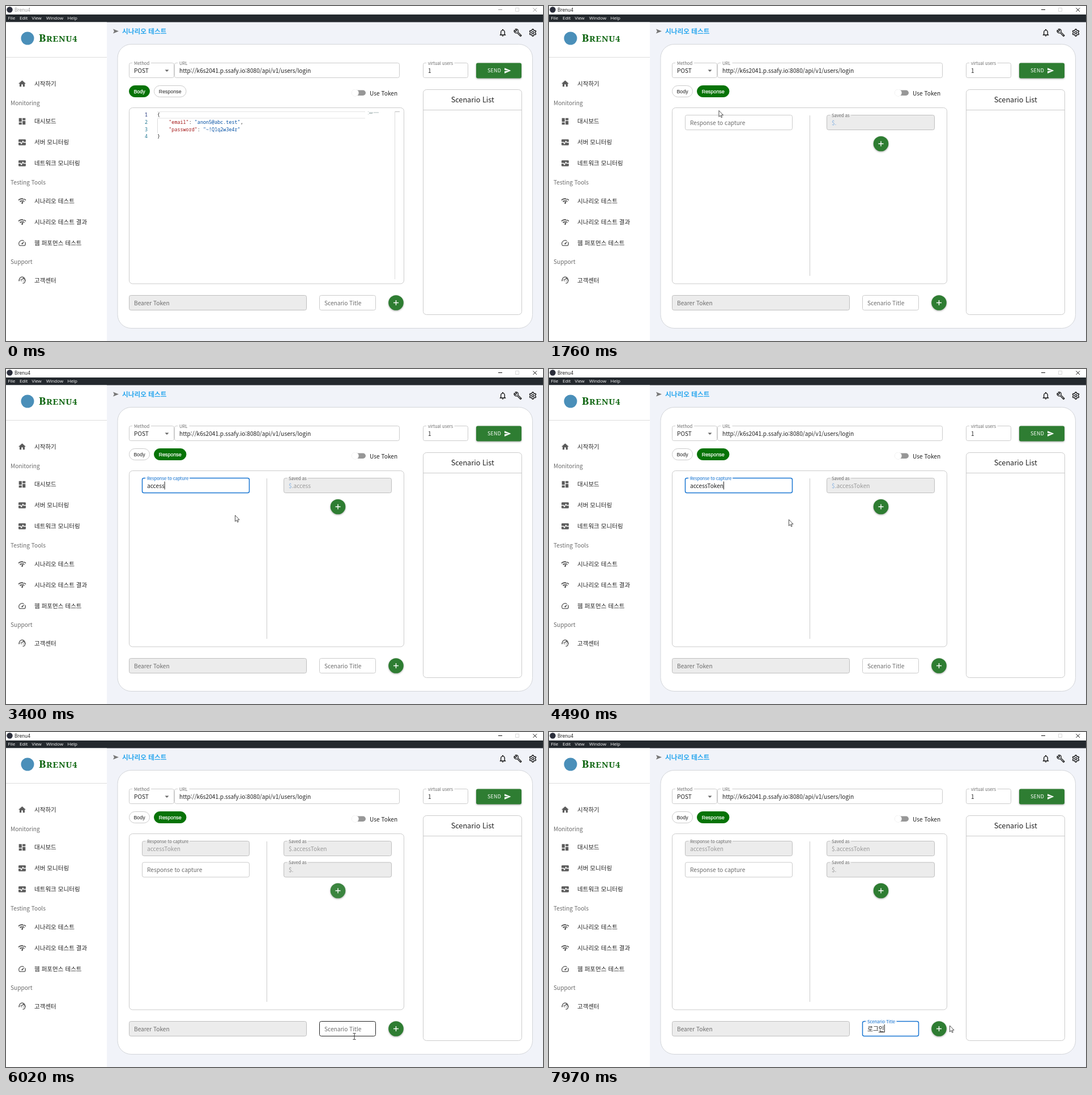
An HTML page that plays this animation: 948 by 591 pixels, repeating every 7990 ms.

```html
<!DOCTYPE html>
<html lang="ko">
<head>
<meta charset="utf-8">
<title>Scenario test</title>
<style>
  html, body { margin: 0; width: 100%; height: 100%; overflow: hidden; background: #f1f3f9; }
  svg { display: block; }
  text { font-family: "Noto Sans CJK KR", "Noto Sans CJK", "Noto Sans", sans-serif; white-space: pre; }
  .menu { font-family: "Open Sans", sans-serif; }
  .chip { font-family: "Liberation Sans", Arial, sans-serif; }
  .code { font-family: "Noto Sans Mono", monospace; }
  .brand { font-family: "Noto Serif", serif; font-weight: 600; letter-spacing: .8px; }
  .raised { filter: drop-shadow(0 1.5px 1.5px rgba(0, 0, 0, .35)); }
</style>
</head>
<body>
<svg width="948" height="591" viewBox="0 0 948 591"><g id="base"></g><g id="live"></g></svg>
<script>
const LOOP = 7990, SIZE = 10.15, SMALL = 7.62;
const BLUE = '#1976d2', GREEN = '#2e7d32', LINE = '#cbcbcb', INK = '#222', MUTED = '#6c6c6c';

const ICONS = {
  home: 'M10 20v-6h4v6h5v-8h3L12 3 2 12h3v8z',
  board: 'M3 13h8V3H3zm0 8h8v-6H3zm10 0h8V11h-8zm0-18v6h8V3z',
  pulse: 'M4 4h16q2 0 2 2v5h-5.500l-1.500-3q-1-1-2 0l-3 6-1.500-3H2V6q0-2 2-2zM2 13h5.300l1.700 3.500q1 1 2 0l3-6 1.300 2.500H22v5q0 2-2 2H4q-2 0-2-2z',
  network: 'M15.900 5c-.2 0-.4.1-.5.4L10.200 17c-.7 1.500.4 3 1.800 3 1 0 1.800-.7 2-1.600L16.400 5.500q0-.5-.5-.5zM1 9l2 2c2.900-2.900 6.800-4.100 10.500-3.600l1.200-2.700C9.900 3.800 4.700 5.300 1 9zm20 2 2-2c-1.600-1.600-3.500-2.800-5.600-3.600l-.5 2.900c1.500.6 2.900 1.500 4.100 2.700zm-4 4 2-2c-.8-.8-1.700-1.400-2.700-1.900l-.5 2.900q.7.4 1.200 1zM5 13l2 2c1.100-1.100 2.600-1.800 4-2l1.300-2.900C9.700 10 7 11 5 13z',
  speed: 'M20.400 8.600l-1.200 1.800a8 8 0 0 1-.3 7.600H5.100A8 8 0 0 1 15.600 6.900l1.800-1.300A10 10 0 0 0 3.400 19a2 2 0 0 0 1.700 1h13.800a2 2 0 0 0 1.800-1 10 10 0 0 0-.3-10.400zm-9.800 6.800a2 2 0 0 0 2.800 0l5.700-8.500-8.500 5.700a2 2 0 0 0 0 2.800z',
  send: 'M2 21 23 12 2 3v7l15 2-15 2z',
  bell: 'M12 22c1.100 0 2-.9 2-2h-4c0 1.100.9 2 2 2zm6-6v-5c0-3.100-1.600-5.600-4.500-6.300V4a1.500 1.500 0 0 0-3 0v.7C7.600 5.400 6 7.900 6 11v5l-2 2v1h16v-1zm-2 1H8v-6c0-2.500 1.500-4.500 4-4.500s4 2 4 4.500z',
  wrench: 'M22.600 19l-9.100-9.100c.9-2.300.5-5.100-1.400-7C9.800.6 6.200.4 3.700 2.300l3.800 3.800-1.400 1.400-3.900-3.800C.4 6.200.6 9.800 2.900 12.100c1.900 1.900 4.600 2.400 6.900 1.500l9.100 9.100q.7.6 1.400 0l2.300-2.300q.7-.7 0-1.400zm-3 1.600-9.500-9.500C7.500 13 3 12 3 7.300l3.100 3 4.200-4.200-3.100-3.100c5 0 6 5 3.800 7.200l9.500 9.500z',
};
const CURSORS = {
  arrow: '<path d="M0 0v11l2.500-2.400 1.600 3.700 1.700-.7-1.600-3.600h3.400z" fill="#fff" stroke="#222" stroke-width=".8"/>',
  hand: '<path transform="translate(-4.400)" d="M3.200 9V1.600a1.200 1.200 0 0 1 2.400 0V6l4.300.9q1.300.4 1.200 1.800l-.5 3.400-1.100 2.700v1H4.600v-1L1 10.400q-.8-1.200.2-1.700.8-.4 2 1z" fill="#fff" stroke="#111" stroke-width=".9"/>',
  beam: '<path d="M-2.500-5.500H-.6L0-5l.6-.5h1.900M0-5V5M-2.500 5.500H-.6L0 5l.6.5h1.900" fill="none" stroke="#333"/>',
};

// Text is placed by the vertical centre of its capitals.
const text = (x, cy, str, fill = INK, size = SIZE, extra = '') =>
  `<text x="${x}" y="${cy + size * .366}" font-size="${size}" fill="${fill}" ${extra}>${str}</text>`;
const rect = (x, y, w, h, fill, stroke = 'none', r = 0, extra = '') =>
  `<rect x="${x}" y="${y}" width="${w}" height="${h}" rx="${r}" fill="${fill}" stroke="${stroke}" ${extra}/>`;
const path = (d, stroke, width = 1, fill = 'none') =>
  `<path d="${d}" stroke="${stroke}" stroke-width="${width}" fill="${fill}"/>`;
const circle = (x, y, r, fill, extra = '') => `<circle cx="${x}" cy="${y}" r="${r}" fill="${fill}" ${extra}/>`;
const icon = (name, cx, cy, fill = '#5c5c5c', px = 15.5) =>
  `<path transform="translate(${cx - px / 2} ${cy - px / 2}) scale(${px / 24})" d="${ICONS[name]}" fill="${fill}" fill-rule="evenodd"/>`;
const addButton = (x, y) => circle(x, y, 13.3, GREEN, 'class="raised"') +
  path(`M${x - 4.5} ${y}h9M${x} ${y - 4.5}v9`, '#fff', 1.4);
const chip = (x, w, label, active, hover) =>
  rect(x, 140.5, w, 20, active ? '#077307' : hover ? '#dedede' : '#fff', active ? '#077307' : LINE, 10) +
  text(x + w / 2, 150.5, label, active ? '#fff' : INK, 8.9,
    `class="chip" text-anchor="middle" ${active ? 'stroke="#fff" stroke-width=".25"' : ''}`);

const pen = document.createElement('canvas').getContext('2d');
function widthOf(str, size) {
  pen.font = `${size}px "Noto Sans CJK KR", "Noto Sans CJK", "Noto Sans", sans-serif`;
  return pen.measureText(str).width;
}

// Outlined input; lift 0 = label inside, 1 = label on the border.
function field(x, y, w, label, { value = '', lift = 1, focus, disabled, hover, ink, size = SIZE } = {}) {
  const labelSize = SIZE + (SMALL - SIZE) * lift, fill = disabled ? '#ececec' : '#fff';
  const edge = focus ? BLUE : hover ? '#222' : disabled ? '#bfbfbf' : LINE;
  let out = rect(x + .5, y + .5, w, 26, fill, edge, 3, `stroke-width="${focus ? 1.5 : 1}"`);
  if (lift) out += rect(x + 6, y - .5, widthOf(label, SMALL) + 6, 2, fill);
  out += text(x + 9, y + 14 - 13 * lift, label, focus ? BLUE : MUTED, labelSize);
  return out + text(x + 9, y + 14, value, ink || (disabled ? '#999' : INK), size);
}
const caret = (x, y) => rect(x, y, 1, 14, '#222');

function gear(cx, cy) {
  let d = '';
  for (let i = 0; i < 24; i++) {
    const a = (i - .5) * Math.PI / 12, r = i % 4 < 2 ? 6 : 4.5;
    d += `${i ? 'L' : 'M'}${cx + r * Math.sin(a)} ${cy - r * Math.cos(a)}`;
  }
  return path(d + 'z', '#111', 1.4) + `<circle cx="${cx}" cy="${cy}" r="1.900" fill="none" stroke="#111" stroke-width="1.300"/>`;
}

function drawBase() {
  const menu = [[3.5, 'File'], [24, 'Edit'], [45.5, 'View'], [71, 'Window'], [108.5, 'Help']];
  const headings = [[171, 'Monitoring'], [311, 'Testing Tools'], [451.5, 'Support']];
  const items = [[137, 'home', '시작하기'], [203.5, 'board', '대시보드'], [240.5, 'pulse', '서버 모니터링'],
    [277.5, 'pulse', '네트워크 모니터링'], [344, 'network', '시나리오 테스트'], [381, 'network', '시나리오 테스트 결과'],
    [418, 'speed', '웹 퍼포먼스 테스트'], [484, '', '고객센터']];
  return rect(0, 0, 948, 591, '#f1f3f9') + rect(0, 0, 948, 15, '#fff') + rect(0, 15, 948, 13.5, '#24292e') +
    circle(6.5, 6.5, 5.2, '#2b2e3b') +
    menu.map(([x, s]) => text(x, 21.5, s, '#fff', 8, 'class="menu"')).join('') +
    rect(0, 28.5, 178, 563, '#fff') + path('M0 90.500H178', '#dcdcdc') +
    circle(38, 57, 11.5, '#4a8fb9') +
    '<text class="brand" x="58" y="63" font-size="18.500" fill="#0d650f">B<tspan font-size="14.800">RENU4</tspan></text>' +
    headings.map(([y, s]) => text(8, y, s, MUTED)).join('') +
    items.map(([y, name, s]) => (name ? icon(name, 28.5, y) : '') + text(50, y, s, INK, 10.55)).join('') +
    path('M23.500 485v-2a5 5 0 0 1 10 0v3q0 3-4 3M23 482.500v3M34 482.500v3M25.500 483q4 0 5-3 1 2.500 3 2.500', '#5c5c5c', 1.3) +
    circle(27, 485, .8, '#5c5c5c') + circle(30.5, 485, .8, '#5c5c5c') +
    path('M189 40.500 199 44.500 189 48.500 191 44.500z', 'none', 0, '#777') +
    text(205, 45, '시나리오 테스트', '#2aa7ee', 11.7, 'font-weight="700"') +
    icon('bell', 877, 47, '#111', 16) + icon('wrench', 903.5, 47, '#111', 15.5) + gear(930, 47) +
    rect(197, 67.5, 732.5, 501, '#fff', '#d3d5d9', 24) +
    field(217, 100, 79, 'Method', { value: 'POST' }) + path('M280.500 112.500h7l-3.500 3.500z', 'none', 0, '#666') +
    field(297, 100, 397, 'URL', { value: 'http://k6s2041.p.ssafy.io:8080/api/v1/users/login' }) +
    field(736, 100, 79, 'virtual users', { value: '1' }) +
    rect(830, 100.5, 80, 27, GREEN, 'none', 3, 'class="raised"') +
    text(850, 114, 'SEND', '#fff', 8.9, 'font-weight="500" letter-spacing=".25"') + icon('send', 885.5, 114, '#fff', 13) +
    rect(613, 148.5, 22, 9.5, '#979797', 'none', 4.75) +
    circle(616.5, 153.2, 6.2, '#fff', 'style="filter:drop-shadow(0 .6px .7px rgba(0,0,0,.25))"') +
    text(642, 154, 'Use Token') +
    rect(217.5, 179.5, 485, 310.5, '#fff', LINE, 6) +
    rect(736.5, 147.5, 174, 397, '#fff', LINE, 6) + path('M737 183.500H910', LINE) +
    text(823.7, 165, 'Scenario List', INK, 12.7, 'text-anchor="middle"') +
    field(217, 510, 313, 'Bearer Token', { lift: 0, disabled: true }) + addButton(688.5, 523.5);
}

function editor(t) {
  const key = s => `<tspan fill="#a31515">${s}</tspan>`, str = s => `<tspan fill="#0451a5">${s}</tspan>`;
  const lines = [[267, '{'], [287.3, key('"email"') + ': ' + str('"anon5@abc.test"') + ','],
    [287.3, key('"password"') + ': ' + str('"~!Q1q2w3e4r"')], [267, '}']];
  const bar = t < 300 ? 0 : t < 1330 ? .24 : .2;
  return path('M267 186.500H634M267 198H634', '#e4e4e4') + path('M267.500 199V224', '#dcdcdc') +
    path('M686.500 186V482', '#dcdcdc') + path('M687 186.500h8', '#bbb') +
    path('M639 186.500h1M641 188h7M649 188h9M641 189.500h6M639 191h1', '#9aa', .8) +
    lines.map(([x, s], i) => {
      const y = 192.3 + i * 12.6;
      return text(250, y, i + 1, i ? '#237893' : '#0b216f', 8.43, 'class="code" text-anchor="end"') +
        text(x, y, s, INK, 8.43, 'class="code"');
    }).join('') + rect(687, 186, 9, 263, `rgba(100,100,100,${bar})`);
}

const KEYS = [2660, 2820, 2970, 3130, 3280, 3400, 3600, 3720, 3920, 4010, 4100];
const JAMO = ['ㄹ', '로', '록', '로그', '로긍', '로그이', '로그인'];
const FOCUS = 2220, ADDED = 5400, TITLE = 6280;
const easeOut = p => 1 - (1 - Math.min(1, Math.max(0, p))) ** 3;

function capture(t) {
  const typed = 'accessToken'.slice(0, KEYS.filter(k => k <= t).length);
  const added = t >= ADDED, focus = t >= FOCUS && !added;
  let out = path('M460.500 193V476', LINE) +
    field(240, 192, 189, 'Response to capture', { value: typed, lift: easeOut((t - FOCUS) / 200), focus, disabled: added, hover: t > 2000 && !added }) +
    field(490, 192, 190, 'Saved as', { value: added ? '$.' + typed : `<tspan fill="#86b2e2">$${typed ? '' : '.'}</tspan>${typed && '.' + typed}`, disabled: true });
  if (focus && (t - 2300 + 1000) % 1000 < 500) out += caret(249 + widthOf(typed, SIZE), 198.5);
  if (!added) return out + addButton(586, 243);
  return out + field(240, 229.5, 189, 'Response to capture', { lift: 0 }) +
    field(490, 229.5, 190, 'Saved as', { value: '$.', disabled: true }) + addButton(586, 280) +
    circle(586, 280, 13.3, `rgba(255,255,255,${.18 * Math.max(0, 1 - (t - ADDED) / 1000)})`);
}

function scenarioTitle(t) {
  const size = 10.8, step = Math.min(6, Math.floor((t - 7100) / 75));
  const hangul = step >= 0 ? JAMO[step] : '';
  const value = hangul || (t >= 6720 && t < 6910 ? 'f' : '');
  const focus = t >= TITLE;
  let out = field(553, 510, 99, 'Scenario Title', { value, size, focus, lift: easeOut((t - TITLE) / 200), hover: t > 5940 && !focus });
  if (!focus) return out;
  const end = 562 + widthOf(value, size);
  if (hangul) out += path(`M${562 + widthOf(hangul.slice(0, -1), size)} 529.500H${end}`, '#222', .9);
  return out + caret(end, 516);
}

const ROUTE = [[20, 840, 553], [400, 531, 338], [790, 289, 151], [1520, 289, 151], [1700, 296, 168], [1900, 309, 222],
  [2200, 326, 214], [2400, 326, 214], [2780, 404.5, 258], [4470, 404.5, 258], [4800, 702, 378], [5160, 602.5, 254],
  [5240, 602.5, 254], [5350, 589, 245], [5450, 589, 245], [5960, 615, 537], [7740, 615, 537], [7850, 655, 545], [7960, 707.5, 518]];

function pointer(t) {
  if (t < 20 || (t >= 6700 && t < 7740)) return '';
  let i = ROUTE.findIndex(k => k[0] > t);
  if (i < 0) i = ROUTE.length - 1;
  const [t0, x0, y0] = ROUTE[i - 1], [t1, x1, y1] = ROUTE[i];
  const p = Math.min(1, (t - t0) / (t1 - t0));
  const x = x0 + (x1 - x0) * p, y = y0 + (y1 - y0) * p;
  const inside = (l, top, r, b) => x > l && x < r && y > top && y < b;
  let kind = 'arrow';
  if (inside(261, 140, 319, 161) || Math.hypot(x - 586, y - 243) < 13 && t > 1500 && t < ADDED) kind = 'hand';
  else if (t < 1500 ? inside(267, 186, 686, 483) : inside(240, 192, 429, 219) || inside(553, 510, 653, 538)) kind = 'beam';
  return `<g transform="translate(${x} ${y})">${CURSORS[kind]}</g>`;
}

function drawLive(t) {
  const active = t >= 1470, response = t >= 1520;
  const chrome = active ? '#111' : '#999';
  return text(15, 6.8, 'Brenu4', chrome, 8.2, 'class="menu"') +
    path('M869 6.500h7', chrome) + path('M899.500 3.500h6v6h-6z', '#d8d8d8') + path('M930.500 3.500l6.500 6.500m0-6.500l-6.500 6.500', chrome) +
    chip(217.5, 36, 'Body', !response) + chip(261.5, 56.5, 'Response', response, t > 760) +
    (response ? capture(t) : editor(t)) + scenarioTitle(t) + pointer(t);
}

const live = document.getElementById('live');
document.getElementById('base').innerHTML = drawBase();
function tick() {
  live.innerHTML = drawLive(performance.now() % LOOP);
  requestAnimationFrame(tick);
}
tick();
</script>
</body>
</html>
```
